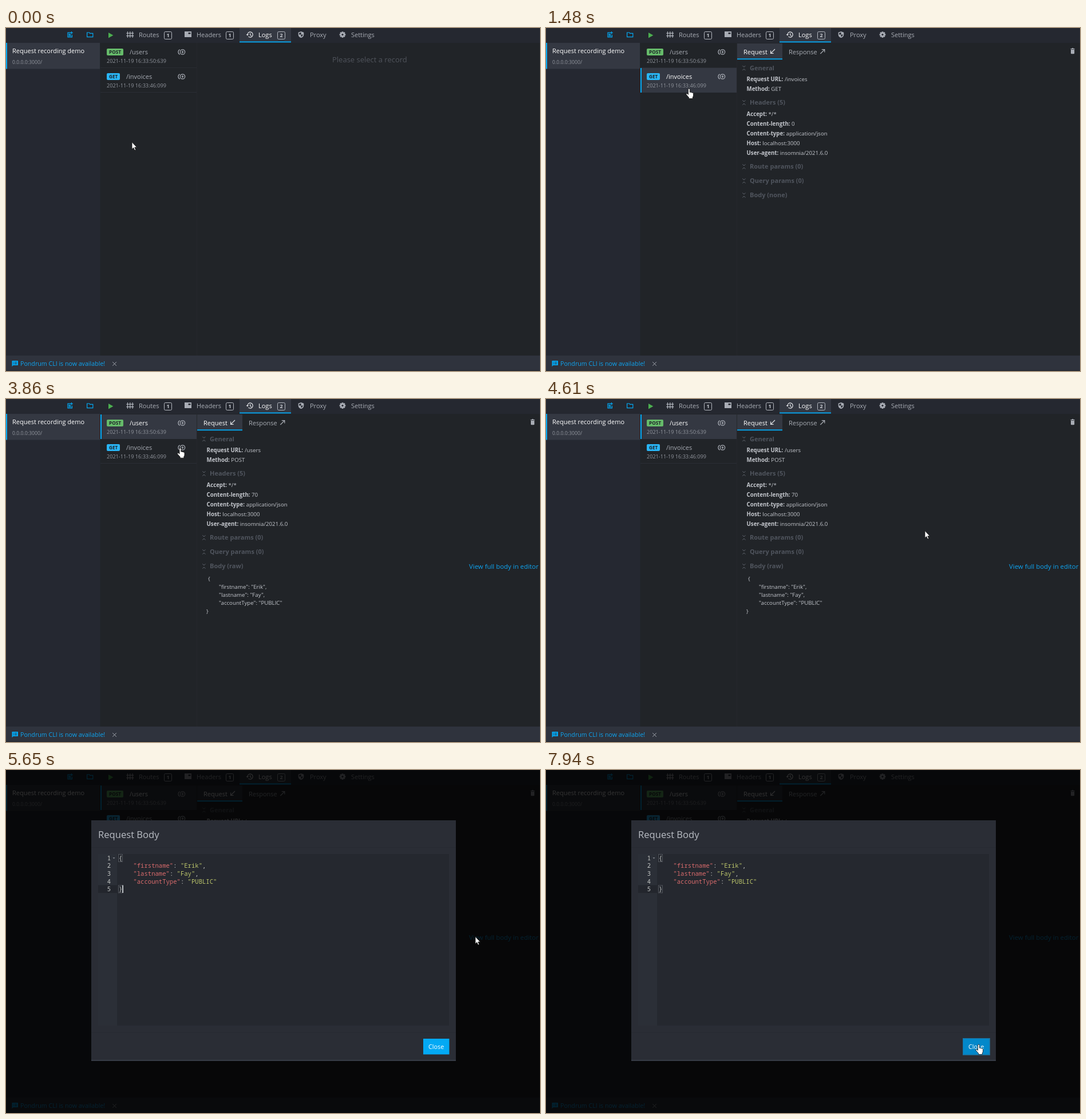
Write an HTML page that moves like this. It is 933 px wide and 600 px high and loops after 8000 ms.

```html
<!DOCTYPE html>
<html lang="en">
<head>
<meta charset="utf-8">
<title>Request log demo</title>
<style>
html, body { margin: 0; width: 100%; height: 100%; overflow: hidden; background: #212428; }
svg { display: block; }
text { font: 11px "Open Sans", "Noto Sans", sans-serif; fill: #a9adb5; }
.white { fill: #fff; }
.blue { fill: #0ea5f2; }
.time { font-size: 9.1px; fill: #92969e; }
.badge { font-size: 8.2px; font-weight: 700; fill: #1f2329; }
.count { font-size: 9px; font-weight: 700; fill: #c9ccd2; text-anchor: middle; }
.section { font-weight: 700; fill: #50555e; }
.detail { font-size: 9.7px; fill: #c3c6cc; }
.bold { font-weight: 700; }
.code { font: 10.58px "Noto Sans Mono", monospace; fill: #c5c8c6; }
.number { text-anchor: end; }
.key { fill: #d96b6c; }
.string { fill: #bcc66b; }
.line { fill: none; stroke: #a9adb5; stroke-width: 1.2; }
</style>
</head>
<body>
<svg id="stage" width="933" height="600" viewBox="0 0 933 600"></svg>
<script>
const ACTIVE = '#343842', BLUE = '#03a9f4', GREY = '#a9adb5';

const rect = (x, y, w, h, fill, extra = '') =>
  `<rect x="${x}" y="${y}" width="${w}" height="${h}" fill="${fill}" ${extra}/>`;
const text = (x, y, content, cls = '', extra = '') =>
  `<text x="${x}" y="${y}" class="${cls}" ${extra}>${content}</text>`;
const line = (d, extra = '') => `<path class="line" d="${d}" ${extra}/>`;
const shape = (d, fill, extra = '') => `<path d="${d}" fill="${fill}" ${extra}/>`;
const group = (id, content) => `<g id="${id}">${content}</g>`;
const blueStroke = `style="stroke:${BLUE}"`;

const count = (x, n) =>
  rect(x + .5, 6.5, 13, 13, 'none', 'rx="2" stroke="#b5b9c0"') + text(x + 7, 16.4, n, 'count');

function gear(x, y) {
  let teeth = '';
  for (let a = 0; a < 180; a += 45)
    teeth += rect(-1.3, -5.4, 2.6, 10.8, GREY, `transform="translate(${x} ${y}) rotate(${a})"`);
  return teeth + `<circle cx="${x}" cy="${y}" r="2.8" fill="none" stroke="${GREY}" stroke-width="2.6"/>`
    + `<circle cx="${x}" cy="${y}" r="1.6" fill="#252830"/>`;
}

const routesIcon = [212.5, 216.8, 221.1].map(x =>
  line(`M${x} 6V17`) + line(`M${x - 2} 9.2h4M${x - 2} 13.6h4`, 'style="stroke-width:1.6"')).join('');

const topBar =
  rect(0, 0, 933, 26, '#252830') +
  line('M113 8.2h-5v7.6h7.4v-4M109.5 10.6h3M109.5 12.2h4M109.5 13.8h4M114.5 6v4.6M112.2 8.3h4.6', blueStroke) +
  line('M141.6 8h4l1.2 1.4h5v6.2h-10.2z', blueStroke) +
  shape('M179 8v9.6l8.4-4.8z', '#4caf50') +
  routesIcon + text(232, 16, 'Routes') + count(276, 1) +
  shape('M312 6h12v10h-12zM318.5 8v2.6h4V8z', GREY, 'fill-rule="evenodd"') +
  text(333, 16, 'Headers') + count(384, 1) +
  rect(408, 0, 90, 25, ACTIVE) + rect(408, 23.5, 90, 1.8, BLUE) +
  line('M422 11.5a4.6 4.6 0 1 1 1.4 3.4M426.6 9v3l2.2 1.4', 'style="stroke:#e2e4e8"') +
  shape('M419.6 11h4.6l-2.3 2.6z', '#e2e4e8') +
  text(441, 16, 'Logs', 'white') + count(474, 2) +
  shape('M515.5 6l4.8 1.8v3.6q0 4-4.8 5.8q-4.8-1.8-4.8-5.8V7.8z', GREY) +
  shape('M515.5 7.6v4h3.4q-.5 2.7-3.4 4v-4h-3.4V8.9z', '#252830') +
  text(531, 16, 'Proxy') + gear(588, 11.6) + text(603, 16, 'Settings');

const sidebar =
  rect(0, 26, 164.5, 547, '#252831') + rect(0, 26, 164, 45.5, ACTIVE) + rect(0, 26, 2, 45.5, BLUE) +
  text(11, 44, 'Request recording demo', 'white') +
  text(11, 63, '0.0.0.0:3000/', 'time', 'style="font-size:8.7px"');

const footer =
  rect(0, 573, 933, 27, '#2f333d') + rect(0, 598.5, 933, 1.5, '#252830') +
  shape('M10.5 582h10.5v8h-8.4l-2.1 2.2z', BLUE) +
  line('M12.5 584.5h1.4M15 584.5h4M12.5 587.3h1.4M15 587.3h4', 'style="stroke:#2f333d"') +
  text(25, 591, 'Pondrum CLI is now available!', 'blue', 'style="font-size:10.65px"') +
  line('M186.3 584.2l6.6 6.6M192.9 584.2l-6.6 6.6', 'style="stroke-width:1"');

function logItem(id, y, method, color, badgeWidth, path, pathX, time) {
  return group(id + 'Bg', rect(165, y, 168, 43, ACTIVE) + rect(165, y, 2, 43, BLUE)) +
    rect(176, y + 9, badgeWidth, 12, color, 'rx="2"') +
    text(180, y + 18, method, 'badge') +
    text(pathX, y + 19, path, '', `id="${id}Path"`) +
    text(176, y + 34.3, time, 'time') +
    `<circle class="line" cx="308.5" cy="${y + 15}" r="4.2"/>` +
    line(`M306.3 ${y + 15}h4.4M308.5 ${y + 12.8}v4.4M303.8 ${y + 10.8}a4.5 4.5 0 0 0 0 8.4`);
}

const list =
  rect(165, 69, 168, 1, '#292c32') + rect(165, 112, 168, 1, '#2b2e35') +
  rect(333, 26, 1, 547, '#25272c') +
  logItem('users', 27, 'POST', '#66bb6a', 29, '/users', 216, '2021-11-19 16:33:50:639') +
  logItem('invoices', 70, 'GET', '#29b6f6', 23, '/invoices', 210, '2021-11-19 16:33:46:099');

const section = (y, title, id = '') =>
  line(`M343.4 ${y - 7.6}l2.5 2.5 2.5-2.5M343.4 ${y + .6}l2.5-2.5 2.5 2.5`, 'style="stroke:#656a73;stroke-width:1"') +
  text(356, y, title, 'section', `id="${id}"`);
const detail = (y, name, value, id = '') =>
  text(350.5, y, `<tspan class="bold">${name}:</tspan> <tspan id="${id}">${value}</tspan>`, 'detail');

const bodyFields = [['firstname', 'Erik'], ['lastname', 'Fay'], ['accountType', 'PUBLIC']];
const comma = i => i < 2 ? ',' : '';

const panel =
  rect(334, 27, 79, 28, ACTIVE) + rect(334, 53.4, 79, 1.8, BLUE) +
  text(345, 45.5, 'Request', 'white') + line('M400 37l-7.4 7.4M392.6 39.4v5h5', 'style="stroke:#e2e4e8"') +
  text(424, 45.5, 'Response') + line('M479.4 45l7.4-7.4M481.8 37.6h5v5') +
  shape('M916.5 36h2l.6-1h2l.6 1h2v1.2h-7.2zM917 38h6.2v6q0 1.2-1.2 1.2h-3.8q-1.2 0-1.2-1.2z', GREY) +
  section(73.5, 'General') +
  detail(93.3, 'Request URL', '', 'url') + detail(110, 'Method', '', 'method') +
  section(134, 'Headers (5)') +
  detail(153.5, 'Accept', '*/*') + detail(171, 'Content-length', '', 'size') +
  detail(188, 'Content-type', 'application/json') + detail(205, 'Host', 'localhost:3000') +
  detail(222, 'User-agent', 'insomnia/2021.6.0') +
  section(246, 'Route params (0)') + section(271, 'Query params (0)') + section(296, '', 'bodyTitle') +
  group('body',
    text(809, 297, 'View full body in editor', 'blue', 'style="font-size:11.4px"') +
    text(353, 317.5, '{', 'detail') +
    bodyFields.map(([k, v], i) =>
      text(372, 331.8 + i * 14.3, `"${k}": "${v}"${comma(i)}`, 'detail')).join('') +
    text(350, 374.7, '}', 'detail'));

const row = i => 157.8 + i * 13.6;
const bracket = i => rect(196.5, row(i) - 10.3, 7, 13, 'none', 'stroke="#50545b"') + text(197, row(i), '{}'[i / 4], 'code');

const modal =
  rect(0, 0, 933, 600, '#000', 'opacity=".8"') +
  rect(149, 88, 637, 421, '#2a2d35') + rect(149, 507, 637, 2, '#373c46') +
  rect(149, 135, 637, 1, '#272a31') + rect(149, 459, 637, 1, '#272a31') +
  text(161, 118.5, 'Request Body', '', 'style="font-size:16.6px;font-weight:500;fill:#b9bdc4"') +
  rect(161, 147, 613, 300, '#25282f') + rect(161, 147, 33, 300, '#2b2f37') +
  rect(161, 201.5, 33, 13.6, '#23262d') +
  [0, 1, 2, 3, 4].map(i => text(183, row(i), i + 1, 'code number')).join('') +
  shape('M186.5 153h4l-2 2.4z', '#7c8088') +
  bracket(0) + bracket(4) +
  bodyFields.map(([k, v], i) => text(222.4, row(i + 1),
    `<tspan class="key">"${k}"</tspan>: <tspan class="string">"${v}"</tspan>${comma(i)}`, 'code')).join('') +
  rect(203.3, 201.5, 1.6, 13.5, '#dcdfe3', 'id="caret"') +
  rect(728, 469, 48, 30, '#1c6f9c', 'id="focusRing"') +
  rect(729, 470, 45.5, 27.5, BLUE, 'id="button"') +
  text(738, 488, 'Close', 'white', 'style="font-size:10.8px"');

const outline = 'stroke="#111" stroke-width=".8"';
const cursor =
  `<circle id="clickRing" cx="0" cy=".8" r="7.3" fill="none" stroke="#0b0c0e" stroke-width="1.3"/>` +
  shape('M0 0v12.6l2.8-2.6 2 4.6 2-.9-2-4.4h3.9z', '#fff', `id="arrow" ${outline}`) +
  shape('M-1.5 10V1.5a1.4 1.4 0 0 1 2.8 0V6.5q1.2-1 2.2 .4q1.2-.8 2 .5q1.3-.5 2 .9V12q0 2-1.2 3v2.5h-6.6v-1.8' +
    'L-4.8 10.6q-.8-1.7 .9-2.1q1 0 2.4 2z', '#fff', `id="hand" ${outline}`);

document.getElementById('stage').innerHTML =
  rect(0, 0, 933, 600, '#212428') + topBar + sidebar + list +
  text(570, 59.5, 'Please select a record', '', 'id="empty" style="font-size:13px;fill:#50545c"') +
  group('panel', panel) + footer + group('modal', modal) + group('cursor', cursor);

const $ = id => document.getElementById(id);
const show = (id, on) => $(id).style.display = on ? '' : 'none';

const easeIn = p => p ** 1.6, easeOut = p => 1 - (1 - p) ** 1.45;
const smooth = p => p * p * (3 - 2 * p), linear = p => p;

// Pointer moves: start, end, steps, target x, target y, easing
const moves = [
  [410, 1160, 10, 250, 106, smooth],
  [1930, 2690, 11, 259.5, 55, smooth],
  [2750, 2751, 1, 258, 55, linear],
  [3590, 4130, 8, 399, 148, easeIn],
  [4220, 4610, 6, 662, 230.5, linear],
  [4690, 4990, 5, 786, 279, easeOut],
  [5070, 5400, 5, 820, 291.5, easeOut],
  [6200, 6980, 12, 790, 408, easeIn],
  [7070, 7550, 7, 756, 480, easeOut],
];

function pointerAt(t) {
  let x = 220, y = 199.5;
  for (const [start, end, steps, toX, toY, ease] of moves) {
    if (t < start) break;
    const step = Math.min(steps, Math.floor((t - start) / (end - start) * (steps - 1) + 1e-6) + 1);
    const p = ease(step / steps);
    x += (toX - x) * p;
    y += (toY - y) * p;
  }
  return [x, y];
}

const records = {
  invoices: { url: '/invoices', method: 'GET', size: '0', bodyTitle: 'Body (none)' },
  users: { url: '/users', method: 'POST', size: '70', bodyTitle: 'Body (raw)' },
};
const during = (t, a, b) => t >= a && t < b;

function render(t) {
  const selected = t < 1330 ? null : t < 3440 ? 'invoices' : 'users';
  const modalOpen = t >= 5650;
  const focused = t >= 7940;
  const [x, y] = pointerAt(t);

  for (const id in records) {
    show(id + 'Bg', id === selected);
    $(id + 'Path').style.fill = id === selected ? '#fff' : '';
  }
  show('empty', !selected);
  show('panel', selected);
  show('body', selected === 'users');
  if (selected)
    for (const [id, value] of Object.entries(records[selected])) $(id).textContent = value;

  show('modal', modalOpen);
  show('caret', !focused && Math.floor((t - 5650) / 552) % 2 === 0);
  const overButton = modalOpen && x > 729 && x < 775 && y > 470;
  $('button').setAttribute('fill', overButton ? '#0288ca' : BLUE);
  show('focusRing', focused);

  const overList = x > 165 && x < 333 && y < 113;
  const overLink = x > 809 && y > 286 && y < 301;
  const pointing = modalOpen ? overButton : overList || overLink;
  show('hand', pointing);
  show('arrow', !pointing);
  show('clickRing', during(t, 1250, 1480) || during(t, 3360, 3590));
  $('cursor').setAttribute('transform', `translate(${x} ${y})`);
}

const begin = performance.now();
function tick() {
  render((performance.now() - begin) % 8000);
  requestAnimationFrame(tick);
}
tick();
</script>
</body>
</html>
```
